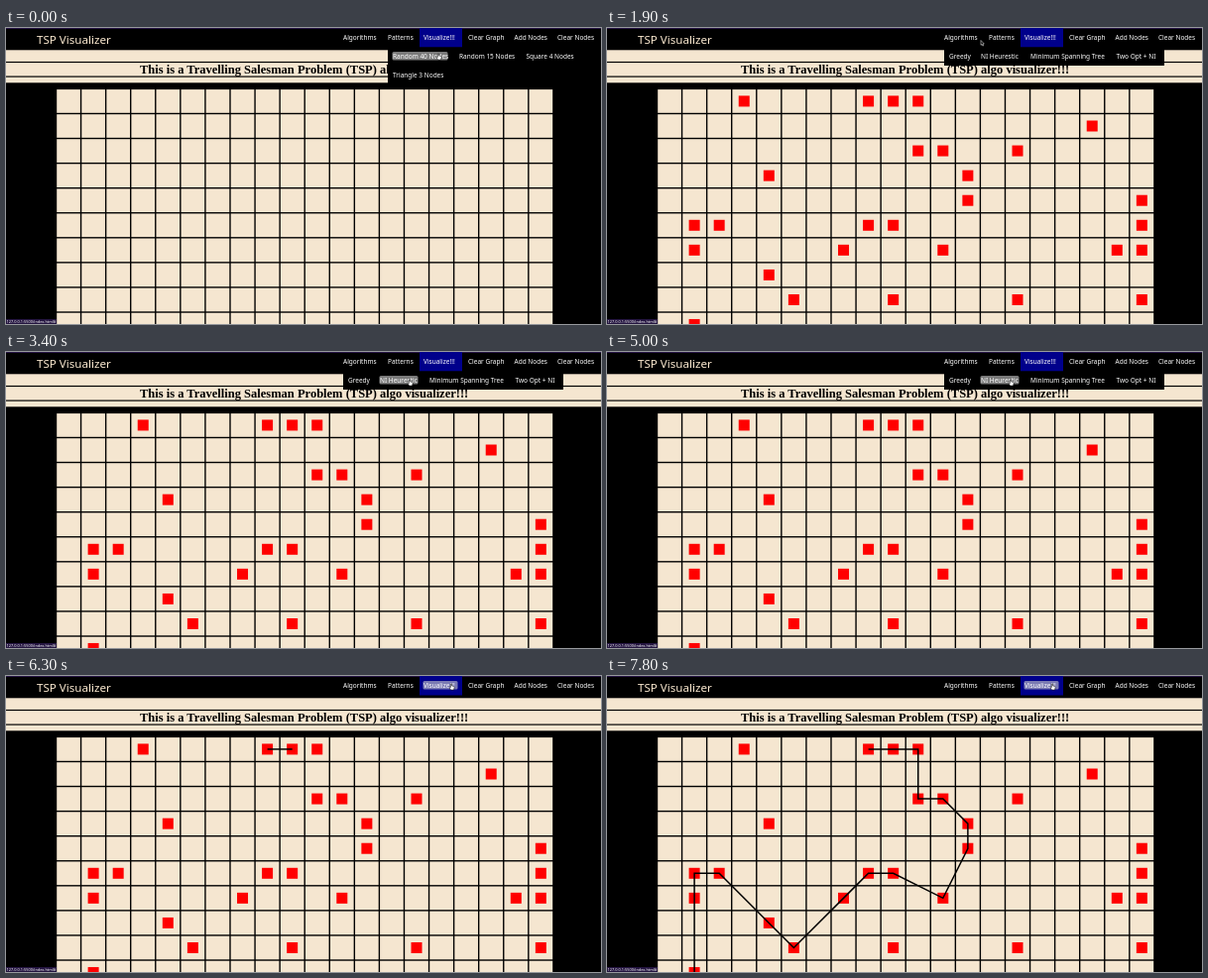
Write an HTML page that moves like this. It is 600 px wide and 299 px high and loops after 8 s.

```html
<!DOCTYPE html>
<html lang="en">
<head>
<meta charset="utf-8">
<title>TSP Visualizer</title>
<style>
  html, body { margin: 0; width: 100%; height: 100%; overflow: hidden; background: #000; }
  svg { display: block; width: 600px; height: 299px; }
  text { font: 6.5px "Noto Sans", "Open Sans", sans-serif; fill: #fff; white-space: pre; }
  .brand { font-size: 11.6px; fill: #fbe9d0; }
  .title { font: bold 12.5px "Liberation Serif", "Times New Roman", serif; fill: #000; }
  .status { font-size: 3.9px; }
</style>
</head>
<body>
<svg id="stage" viewBox="0 0 600 299"></svg>
<script>
const LOOP = 8000, STEP = 100;
const CREAM = '#f5e6d0';
const GRID = { x: 50.5, y: 61.4, size: 25.07, cols: 20, rows: 10 };
const stage = document.getElementById('stage');

function add(tag, attrs, parent = stage, label) {
  const el = document.createElementNS('http://www.w3.org/2000/svg', tag);
  for (const key in attrs) el.setAttribute(key, attrs[key]);
  if (label) el.textContent = label;
  parent.appendChild(el);
  return el;
}
const box = (x, y, width, height, fill, parent) => add('rect', { x, y, width, height, fill }, parent);
const show = (el, on) => el.setAttribute('visibility', on ? 'visible' : 'hidden');
const center = ([col, row]) => [GRID.x + (col + .5) * GRID.size, GRID.y + (row + .5) * GRID.size];

// Page
box(0, 0, 600, 299, '#000');
box(0, 0, 600, 1, '#21103f');
box(0, 22.3, 600, 33, CREAM);
box(0, 33.9, 600, 1.2, '#000');
box(0, 48.5, 600, 1.2, '#000');
add('text', { x: 135, y: 46, class: 'title' }, stage,
  'This is a Travelling Salesman Problem (TSP) algo visualizer!!!');
add('text', { x: 31, y: 15.6, class: 'brand' }, stage, 'TSP Visualizer');
box(417, 0, 43, 19.5, '#00008b');

for (let row = 0; row < GRID.rows; row++)
  for (let col = 0; col < GRID.cols; col++)
    box(GRID.x + col * GRID.size + .7, GRID.y + row * GRID.size + .7,
      GRID.size - 1.4, GRID.size - 1.4, CREAM);

// Nodes as [column, row], in order of appearance
const nodes = [
  [8, 5], [4, 3], [14, 8], [1, 6], [10, 0], [12, 4], [2, 5], [9, 8], [11, 2],
  [3, 0], [18, 6], [7, 6], [1, 9], [12, 3], [9, 0], [5, 8], [14, 2], [9, 5],
  [4, 7], [8, 0], [19, 5], [11, 6], [1, 5], [19, 8], [10, 2], [19, 4], [19, 6], [17, 1]
].map(cell => {
  const [x, y] = center(cell);
  return box(x - 5.5, y - 5.5, 11, 11, '#f00');
});

const tour = [
  [8, 0], [9, 0], [10, 0], [10, 2], [11, 2], [12, 3], [12, 4], [11, 6], [9, 5],
  [8, 5], [7, 6], [5, 8], [4, 7], [2, 5], [1, 5], [1, 6], [1, 9]
].map(center);
const route = add('polyline', { fill: 'none', stroke: '#000', 'stroke-width': 1.5 });

// Menus
const links = [];
function link(label, x, y, width, menu, parent) {
  const glow = box(x - .5, y - 7, width + 1, 8.6, 'rgba(205,205,205,.6)', parent);
  glow.setAttribute('rx', 1.5);
  add('text', { x, y }, parent, label);
  links.push({ x, y: y - 7, width, menu, glow });
}
const bar = add('g', {});
link('Algorithms', 340, 12, 34, 'bar', bar);
link('Patterns', 385, 12, 25, 'bar', bar);
link('Visualize!!!', 421, 12, 34, 'bar', bar);
link('Clear Graph', 466, 12, 36, 'bar', bar);
link('Add Nodes', 512.5, 12, 33, 'bar', bar);
link('Clear Nodes', 556, 12, 37, 'bar', bar);

const patterns = add('g', {});
box(385, 19.5, 215, 37, '#000', patterns);
link('Random 40 Nodes', 390, 31, 55, 'patterns', patterns);
link('Random 15 Nodes', 457, 31, 55, 'patterns', patterns);
link('Square 4 Nodes', 524.5, 31, 48, 'patterns', patterns);
link('Triangle 3 Nodes', 390, 50, 51, 'patterns', patterns);

const algorithms = add('g', {});
box(340, 19.5, 222, 18.5, '#000', algorithms);
link('Greedy', 345, 31, 21, 'algorithms', algorithms);
link('NI Heurestic', 377, 31, 38, 'algorithms', algorithms);
link('Minimum Spanning Tree', 427, 31, 75, 'algorithms', algorithms);
link('Two Opt + NI', 513.5, 31, 39, 'algorithms', algorithms);

box(0, 294, 51, 5, '#23143f');
add('text', { x: .5, y: 298.2, class: 'status' }, stage, '127.0.0.1:5500/index.html#');

// Pointer
const pointer = { fill: '#fff', stroke: '#000', 'stroke-width': .5, 'stroke-linejoin': 'round' };
const hand = add('path', { ...pointer,
  d: 'M-.6 0Q0 -.6 .6 0V2L2.6 2.4Q3.3 2.7 3.1 3.6L2.6 6H-.5L-2 3.6Q-1.6 2.9 -.6 3.5Z' });
const arrow = add('path', { ...pointer, fill: '#000', stroke: '#fff',
  d: 'M0 0V4.8L1.1 3.8L1.9 5.6L2.7 5.2L1.9 3.5H3.3Z' });

// [time, x, y]
const moves = [
  [0, 436, 26], [1300, 436, 26], [1700, 402, 20], [1900, 377, 12.5], [2100, 376, 13.5],
  [2300, 376, 13.5], [2700, 362, 26], [3100, 390, 27], [3400, 407, 28], [4000, 407, 28],
  [4300, 407, 28], [5000, 407, 28], [5400, 449, 8], [8000, 449, 8]
];
function pointerAt(t) {
  const i = moves.findIndex(m => m[0] > t);
  const [t0, x0, y0] = moves[i - 1], [t1, x1, y1] = moves[i];
  const p = (t - t0) / (t1 - t0), e = p * p * (3 - 2 * p);
  return [x0 + (x1 - x0) * e, y0 + (y1 - y0) * e];
}

function draw(t) {
  const menu = t < 1900 ? 'patterns' : t < 5300 ? 'algorithms' : '';
  const [x, y] = pointerAt(t);
  show(patterns, menu === 'patterns');
  show(algorithms, menu === 'algorithms');

  let over = false;
  for (const l of links) {
    const hit = (l.menu === 'bar' || l.menu === menu) &&
      x >= l.x && x <= l.x + l.width && y >= l.y && y <= l.y + 8.6;
    show(l.glow, hit);
    over = over || hit;
  }
  show(hand, over);
  show(arrow, !over);
  for (const shape of [hand, arrow]) shape.setAttribute('transform', `translate(${x} ${y})`);

  nodes.forEach((node, i) => show(node, t >= 100 + i * 1200 / (nodes.length - 1)));

  const legs = Math.max(0, Math.min(tour.length - 1, t / 100 - 62));
  route.setAttribute('points', legs ? tour.slice(0, legs + 1).join(' ') : '');
}

const start = performance.now();
function tick() {
  const t = Math.max(0, performance.now() - start) % LOOP;
  draw(Math.floor(t / STEP) * STEP);
  requestAnimationFrame(tick);
}
tick();
</script>
</body>
</html>
```
